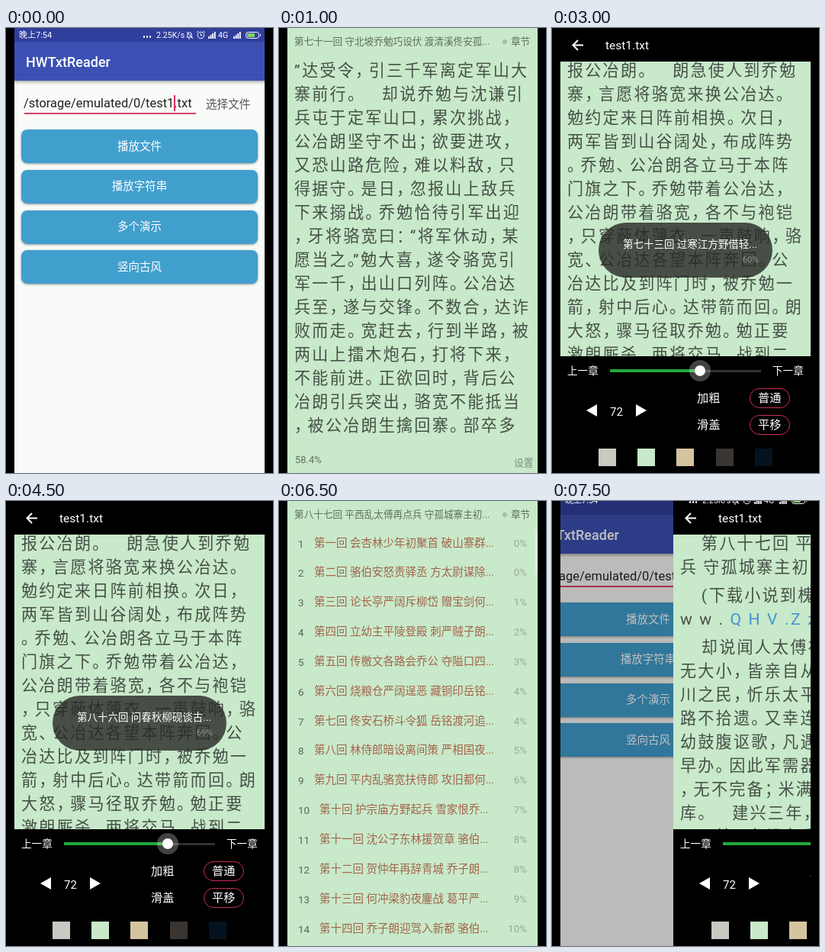
Write an HTML page that moves like this. It is 350 px wide and 583 px high and loops after 8000 ms.

```html
<!DOCTYPE html>
<html lang="zh-CN">
<head>
<meta charset="utf-8">
<style>
html, body { margin: 0; width: 100%; height: 100%; overflow: hidden; background: #000; }
#stage { position: relative; width: 350px; height: 583px; overflow: hidden; clip-path: inset(0 11px);
  font-family: Roboto, "Noto Sans CJK SC", "Noto Sans CJK", sans-serif; }
#stage div, #stage span, #stage svg { position: absolute; box-sizing: border-box; }
#stage span { line-height: 20px; white-space: pre; }
.layer { left: 0; top: 0; width: 350px; height: 583px; }
.page span { font-weight: 300; letter-spacing: 2.2px; word-spacing: -.5px; }
.page i { font-style: normal; letter-spacing: -3.5px; }
.page em { font-style: normal; font-weight: 400; letter-spacing: 2.6px; }
.page b { font-weight: 300; color: #4194d0; }
</style>
</head>
<body>
<div id="stage"></div>
<script>
const GREEN = '#c8e9ca', PAPER = '#f9fbf8', INK = '#455047', SOFT = '#5f6f61';
const CENTER = 'left:0;width:350px;text-align:center;';

const text = (x, y, size, color, str, css = '') =>
  `<span style="left:${x}px;top:${y - 10}px;font-size:${size}px;color:${color};${css}">${str}</span>`;
const box = (x, y, w, h, color, css = '') =>
  `<div style="left:${x}px;top:${y}px;width:${w}px;height:${h}px;background:${color};${css}"></div>`;
const dot = (x, y, r, color) => box(x - r, y - r, 2 * r, 2 * r, color, 'border-radius:50%');
const layer = (html, dx = 0, cls = '', dy = 0) =>
  `<div class="layer ${cls}" style="transform:translate(${dx}px,${dy}px)">${html}</div>`;
const svg = body => `<svg class="layer" width="350" height="583" fill="none">${body}</svg>`;

// Lines are split by "/"; a leading "|" opens a paragraph, "{}" marks a link.
function page(str, dx = 0) {
  let y = 24.5;
  const lines = str.split('/').map(line => {
    y += line[0] === '|' ? 37 : 31.05;
    const html = line.replace('|', '')
      .replace(/[\w“”().]+/g, '<em>$&</em>')
      .replace(/\{(.*?)\}/g, '<b>$1</b>')
      .replace(/[，。；：、]/g, '<i>$&</i>');
    return text(20, y, 21.1, INK, html);
  });
  return layer(lines.join(''), dx, 'page');
}

const PAGE_A = '”达受令，引三千军离定军山大/寨前行。    却说乔勉与沈谦引/兵屯于定军山口，累次挑战，/' +
  '公冶朗坚守不出；欲要进攻，/又恐山路危险，难以料敌，只/得据守。是日，忽报山上敌兵/' +
  '下来搦战。乔勉恰待引军出迎/，牙将骆宽曰：“将军休动，某/愿当之。”勉大喜，遂令骆宽引/' +
  '军一千，出山口列阵。公冶达/兵至，遂与交锋。不数合，达诈/败而走。宽赶去，行到半路，被/' +
  '两山上擂木炮石，打将下来，/不能前进。正欲回时，背后公/冶朗引兵突出，骆宽不能抵当/，被公冶朗生擒回寨。部卒多';
const PAGE_B = '降。有败军逃得性命，回报乔/勉，说骆宽被擒。勉慌与沈谦/商议，谦曰：“朗为人轻躁，恃/' +
  '勇少谋。可激劝士卒，拔寨前/进，步步为营，诱朗来战而擒/之。”勉用其谋，将应有之物，/' +
  '尽赏三军，欢声满谷，愿效死/战。乔勉即日拔寨而进，步步/为营；每营住数日，又进。朗/' +
  '闻之，欲出战。左右曰：“此计/不可出战，战则有失。”朗不从/，令公冶达引数千兵出战，直/' +
  '到乔勉寨前。勉上马提刀出迎/，与公冶达交马，只一合，生/擒公冶达归寨。余皆败走，回';
const PAGE_C = '报公冶朗。    朗急使人到乔勉/寨，言愿将骆宽来换公冶达。/勉约定来日阵前相换。次日，/' +
  '两军皆到山谷阔处，布成阵势/。乔勉、公冶朗各立马于本阵/门旗之下。乔勉带着公冶达，/' +
  '公冶朗带着骆宽，各不与袍铠/，只穿蔽体薄衣。一声鼓响，骆/宽、公冶达各望本阵奔回。公/' +
  '冶达比及到阵门时，被乔勉一/箭，射中后心。达带箭而回。朗/大怒，骤马径取乔勉。勉正要/' +
  '激朗厮杀。两将交马，战到二';
const PAGE_D = '    第八十七回 平西乱太傅再点/兵 守孤城寨主初献降/|    (下载小说到槐    砚    屋 {W}/' +
  'w w . {Q H V .Z z})/|    却说闻人太傅在于成都，事/无大小，皆亲自从公决断。两/' +
  '川之民，忻乐太平，夜不闭户，/路不拾遗。又幸连年大熟，老/幼鼓腹讴歌，凡遇差徭，争先/' +
  '早办。因此军需器械应用之物/，无不完备；米满仓廒，财盈府/库。    建兴三年，益州飞报：蛮/' +
  '王石蛟，大起蛮兵十万，犯境/侵掠。建宁太守丁峦，乃汉朝/什方侯丁柏之后，今结连石蛟';
const HEAD_A = '第七十一回 守北坡乔勉巧设伏 渡清溪佟安孤...';
const HEAD_D = '第八十七回 平西乱太傅再点兵 守孤城寨主初...';

const CHAPTERS = `第一回 会杏林少年初聚首 破山寨群
第二回 骆伯安怒责驿丞 方太尉谋除
第三回 论长亭严阔斥柳岱 赠宝剑何
第四回 立幼主平陵登殿 刺严贼子朗
第五回 传檄文各路会乔公 夺隘口四
第六回 烧粮仓严阔逞恶 藏铜印岳铭
第七回 佟安石桥斗令狐 岳铭渡河追
第八回 林侍郎暗设离间策 严相国夜
第九回 平内乱骆宽扶侍郎 攻旧都何
第十回 护宗庙方野起兵 雪家恨乔
第十一回 沈公子东林援贺章 骆伯
第十二回 贺仲年再辞青城 乔子朗
第十三回 何冲梁豹夜鏖战 葛平严
第十四回 乔子朗迎驾入新都 骆伯`.split('\n');
const SHARES = [0, 0, 1, 2, 3, 4, 4, 5, 6, 7, 8, 8, 9, 10];

const status = dy => {
  const bars = x => [0, 1, 2, 3].map(i =>
    `<path d="M${x + i * 2.6} 14v${-3 - i * 2}" stroke="#fff" stroke-width="1.8"/>`).join('');
  return layer(text(17, 9.5, 11, '#fff', '晚上7:54') + text(197, 9.5, 10.6, '#fff', '2.25K/s') +
    text(278, 9.5, 10.6, '#fff', '4G') + [181, 185, 189].map(x => dot(x, 11.5, 1.2, '#fff')).join('') +
    svg(`<g stroke="#fff"><path d="M237 12h7l-1-2v-3q-2.500-3-5 0v3zM239 14h2M237 5l8 9"/>
      <circle cx="255.500" cy="9.500" r="4.200"/><path d="M255.500 7v3h2M250 6l2.500-2M261 6l-2.500-2"/>
      <rect x="314.500" y="5.500" width="17" height="8" rx="3"/><path d="M333.500 8v3"/></g>
      <rect x="316" y="7" width="10" height="5" rx="1" fill="#7ed36a"/>${bars(266)}${bars(299)}`), 0, '', dy);
};

const home = (dx = 0) => layer(
  box(-40, 0, 430, 583, PAPER) +
  box(-40, 18, 430, 51, '#3c50b3', 'box-shadow:0 2px 4px #0005') + box(-40, 0, 430, 18, '#303e9c') +
  text(26, 45, 18, '#fff', 'HWTxtReader', 'font-weight:500') +
  text(23, 99, 16.45, '#222', '/storage/emulated/0/test1.txt') +
  box(24, 111, 225, 2, '#dc4169') + box(220, 88, 1.5, 21, '#dc2f5c') +
  text(262, 99.5, 14.6, '#555', '选择文件') +
  ['播放文件', '播放字符串', '多个演示', '竖向古风'].map((label, i) =>
    box(20, 133 + i * 52.8, 310, 44, '#419fce', 'border-radius:8px;box-shadow:0 1px 3px #0006') +
    text(0, 155.5 + i * 52.8, 14.5, '#fff', label, CENTER)).join(''), dx);

const reader = (bg, head, body, share) =>
  box(11, 0, 328, 583, bg) + body +
  text(20, 18, 12.65, SOFT, head) + dot(296, 18, 3.3, '#a9bbaa') + text(304, 18, 12.6, SOFT, '章节') +
  text(21, 566, 13, SOFT, share) + text(308, 570, 12.8, '#7c8d7e', '设置');

function menu(share, pressed) {
  const x = 75 + 1.98 * share;
  const option = (y, label, value) => text(190, y, 15.2, '#fff', label) +
    box(259, y - 13, 53, 26, 'none', 'border:1px solid #c9304f;border-radius:13px') +
    text(270, y, 15.2, '#fff', value);
  return box(11, 0, 328, 44, '#000') + box(11, 430, 328, 153, '#000') +
    svg(`<path d="M41 22.500H28M34 16l-6.500 6.500L34 29" stroke="#fff" stroke-width="2"/>
      <path d="M59 493v16l-14-8zM110 493v16l14-8z" fill="#fff"/>`) +
    text(70, 23, 15.5, '#fff', 'test1.txt') +
    text(20, 449, 13.6, '#fff', '上一章') + text(289, 449, 13.6, '#fff', '下一章') +
    box(76, 447.5, 198, 3, '#35312c') + box(76, 447, x - 76, 4, '#20a93a') +
    (pressed ? dot(x, 449, 14, '#ffffff42') : '') + dot(x, 449, 7, '#fff') +
    text(76, 503, 15, '#fff', '72') + option(485, '加粗', '普通') + option(520, '滑盖', '平移') +
    ['#c9c8c2', GREEN, '#d5c59f', '#3a3531', '#04131f'].map((c, i) =>
      box(61 + i * 51.2, 551, 23, 23, c)).join('');
}

const toast = (title, share) =>
  box(61, 255, 228, 72, '#282a28cf', 'border-radius:36px') +
  text(93, 283, 13.5, '#fff', title + '...') +
  text(0, 303, 11.5, '#8d968d', share + '%', 'left:auto;right:79px');

const list = () => box(11, 38, 328, 545, GREEN) + box(335, 38, 4, 58, '#d9f0db') +
  CHAPTERS.map((name, i) => {
    const y = 55.5 + i * 38.85;
    return text(25, y, 13.5, '#59665b', i + 1) + text(i < 9 ? 46 : 53, y, 14.5, '#a3644a', name + '...') +
      text(0, y, 13.3, '#98a999', SHARES[i] + '%', 'left:auto;right:25px');
  }).join('');

const DRAG = [
  ['第七十三回 过寒江方野借轻', 60], ['第七十九回 访幽谷贺章问归', 64],
  ['第八十三回 燃烽火葛平守边', 67], ['第八十六回 问春秋柳砚谈古', 69]
];

function scene(step) {
  const early = body => reader(GREEN, HEAD_A, body, '58.4%');
  const late = () => reader(GREEN, HEAD_D, page(PAGE_D), '70.4%');
  if (step === 0) return home() + status(0);
  if (step === 1) return reader(PAPER, '', '', '');
  if (step === 2) return early(page(PAGE_A));
  if (step === 3) return early(page(PAGE_A, -200) + page(PAGE_B, 128));
  if (step < 6) return early(page(PAGE_C)) + menu(58.4);
  if (step < 10) {
    const [title, share] = DRAG[step - 6];
    return early(page(PAGE_C)) + menu(share, true) + toast(title, share);
  }
  if (step === 11) return late();
  if (step === 12 || step === 13) return late() + list();
  const front = late() + menu(70.4);
  if (step < 15) return front;
  return home(-49) + box(0, 0, 350, 583, '#00000040') + layer(front, 148) + status(-10);
}

const stage = document.getElementById('stage');
let shown = -1;
function tick() {
  const step = Math.floor(performance.now() % 8000 / 500);
  if (step !== shown) stage.innerHTML = scene(shown = step);
  requestAnimationFrame(tick);
}
tick();
</script>
</body>
</html>
```
